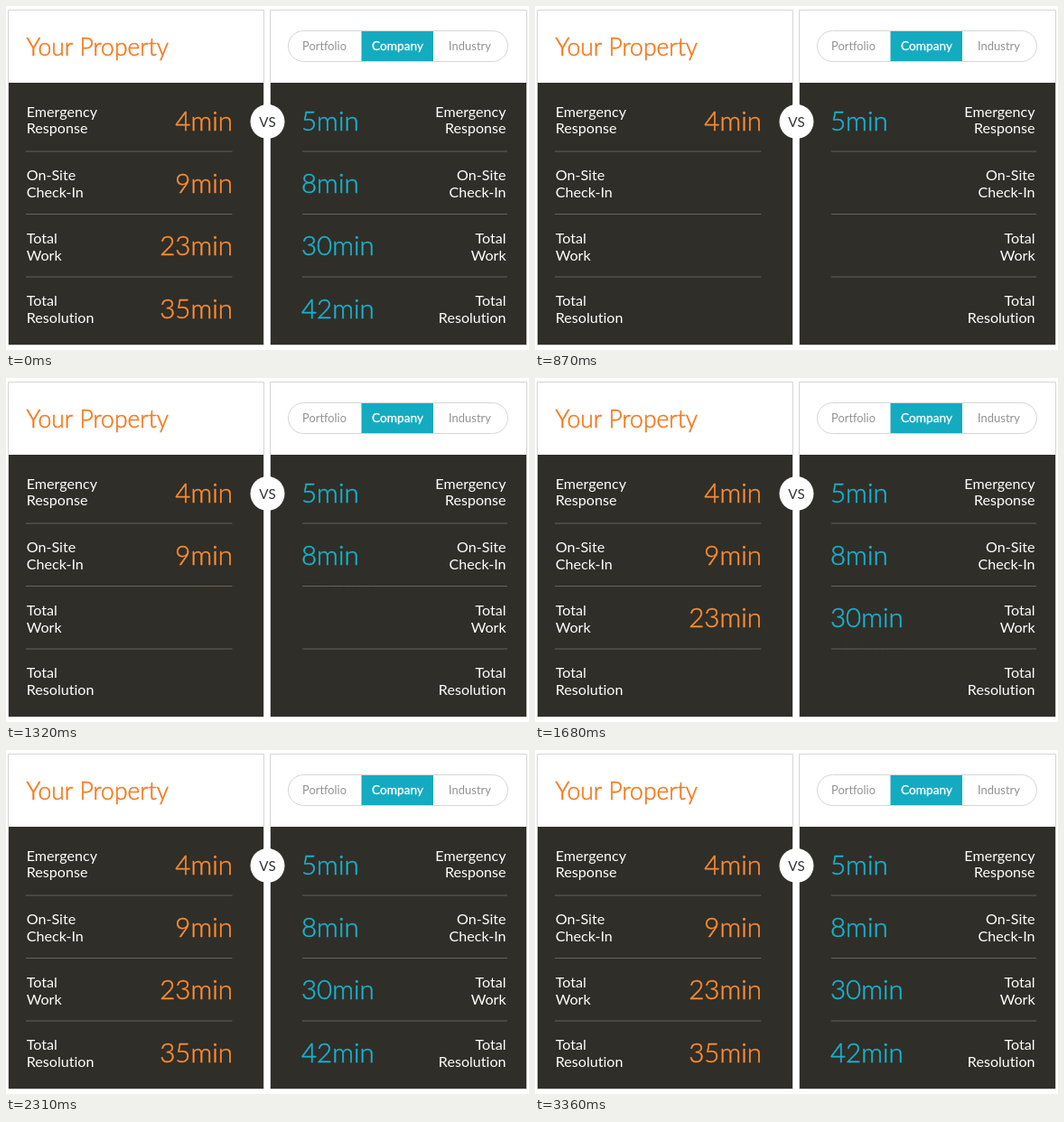
These frames come from a looping animation (579 by 381 pixels, 3390 ms). An HTML page with a canvas:

```html
<!DOCTYPE html>
<html lang="en">
<head>
<meta charset="utf-8">
<title>Property comparison</title>
<style>
  html, body { margin: 0; width: 100%; height: 100%; overflow: hidden; background: #fff; }
  canvas { display: block; width: 579px; height: 381px; }
</style>
</head>
<body>
<canvas id="stage"></canvas>
<script>
const WIDTH = 579, HEIGHT = 381;
const LOOP = 3390, CLEAR_AT = 30;
const FIRST_ENTRY = 600, STAGGER = 360, ENTRY_TIME = 150, DROP = 34;
const DARK = '#302e28', TITLE = '#f47b20', ORANGE = '#fb8e35', TEAL = '#17b4d0';
const TAB = '#14abc0', GREY = '#929292', BORDER = '#d6d6d6';

const rows = [
  { label: ['Emergency', 'Response'], lines: [123, 141], mine: '4min', theirs: '5min', base: 137.5 },
  { label: ['On-Site', 'Check-In'], lines: [193, 212], mine: '9min', theirs: '8min', base: 206.5 },
  { label: ['Total', 'Work'], lines: [263, 282], mine: '23min', theirs: '30min', base: 276 },
  { label: ['Total', 'Resolution'], lines: [332, 351], mine: '35min', theirs: '42min', base: 345.5 }
];

const canvas = document.getElementById('stage');
const ctx = canvas.getContext('2d');
const ratio = window.devicePixelRatio || 1;
canvas.width = WIDTH * ratio;
canvas.height = HEIGHT * ratio;
ctx.scale(ratio, ratio);
ctx.lineJoin = 'round';
ctx.letterSpacing = '0.01px'; // any spacing turns ligatures off

function text(str, x, y, size, color, align = 'left', weight = 400, outline = 0) {
  ctx.font = `${weight} ${size}px Lato, sans-serif`;
  ctx.textAlign = align;
  ctx.fillStyle = ctx.strokeStyle = color;
  ctx.fillText(str, x, y);
  if (outline) {
    ctx.lineWidth = outline;
    ctx.strokeText(str, x, y);
  }
}

function box(x, y, w, h, color) {
  ctx.fillStyle = color;
  ctx.fillRect(x, y, w, h);
}

function panel(x, w) {
  ctx.strokeStyle = BORDER;
  ctx.lineWidth = 1;
  ctx.strokeRect(x + 0.5, 4.5, w - 1, 371);
  box(x + 1, 85, w - 2, 290, DARK);
}

function tabs() {
  const left = 312.5, right = 555.5, top = 27.5, bottom = 61.5, r = 17;
  ctx.beginPath();
  ctx.arc(left + r, top + r, r, Math.PI / 2, Math.PI * 1.5);
  ctx.arc(right - r, top + r, r, -Math.PI / 2, Math.PI / 2);
  ctx.closePath();
  ctx.strokeStyle = BORDER;
  ctx.lineWidth = 1;
  ctx.stroke();
  box(393.5, 28, 79.5, 33, TAB);
  text('Portfolio', 352.5, 49, 12.8, GREY, 'center');
  text('Company', 433.5, 49, 13.7, '#fff', 'center', 400, 0.3);
  text('Industry', 513.5, 49, 13, GREY, 'center');
}

function entryProgress(index, time) {
  if (time < CLEAR_AT) return 1;
  const t = (time - FIRST_ENTRY - index * STAGGER) / ENTRY_TIME;
  return Math.sin(Math.min(1, Math.max(0, t)) * Math.PI / 2);
}

function drawRow(row, index, time) {
  row.label.forEach((word, i) => {
    text(word, 22.7, row.lines[i], 16.1, '#fff');
    text(word, 553.6, row.lines[i], 16.1, '#fff', 'right');
  });
  if (index) {
    const y = 91 + index * 69.5;
    box(22, y, 228.5, 1, '#65635e');
    box(328, y, 227, 1, '#65635e');
  }
  const shown = entryProgress(index, time);
  if (!shown) return;
  const y = row.base - DROP * (1 - shown);
  ctx.globalAlpha = shown;
  text(row.mine, 251, y, 29.5, ORANGE, 'right', 300, 0.5);
  text(row.theirs, 327, y, 29.5, TEAL, 'left', 300, 0.5);
  ctx.globalAlpha = 1;
}

function draw(time) {
  box(0, 0, WIDTH, HEIGHT, '#fff');
  panel(2, 284);
  panel(292, 285);
  text('Your Property', 22.5, 54.5, 26.5, TITLE, 'left', 300, 0.6);
  tabs();
  rows.forEach((row, i) => drawRow(row, i, time));
  ctx.beginPath();
  ctx.arc(289.5, 128, 19, 0, Math.PI * 2);
  ctx.fillStyle = '#fff';
  ctx.fill();
  text('VS', 289.5, 133.5, 15.2, '#333', 'center');
}

const start = performance.now();
function tick() {
  draw((performance.now() - start) % LOOP);
  requestAnimationFrame(tick);
}
tick();
</script>
</body>
</html>
```
